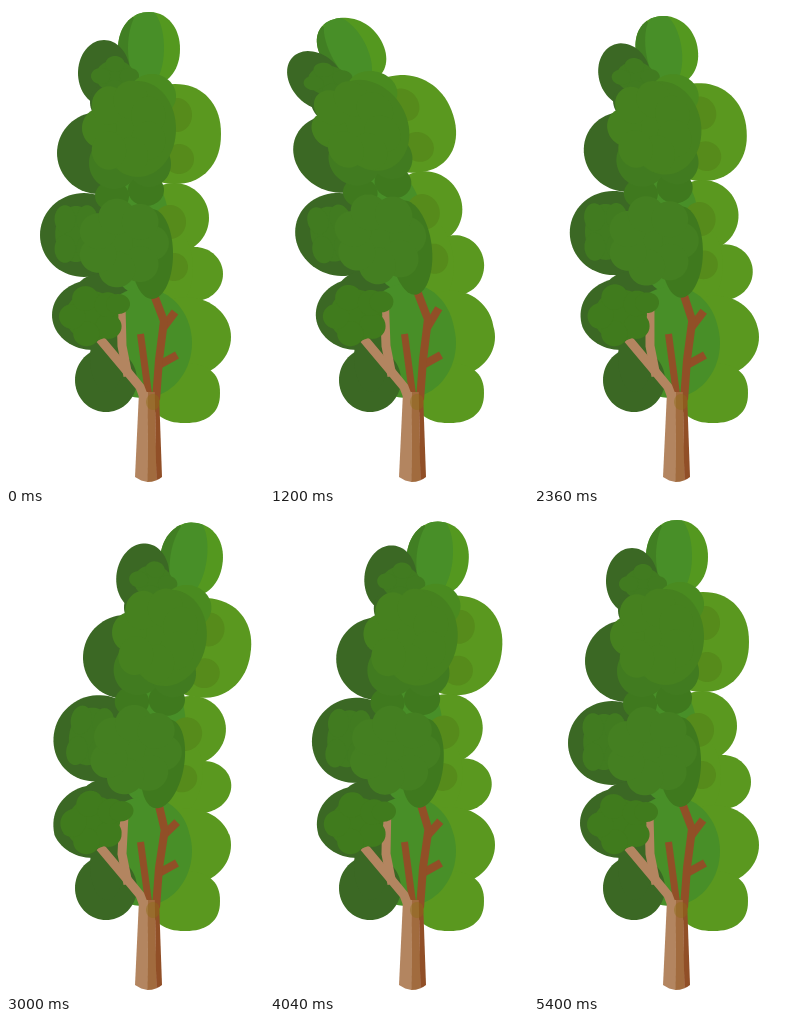
An HTML page with a canvas for the animation above (5.8 s loop, 258 by 480 pixels).

```html
<!DOCTYPE html>
<html>
<head>
<meta charset="utf-8">
<style>
  html, body { margin: 0; height: 100%; overflow: hidden; background: #fff; }
  canvas { display: block; }
</style>
</head>
<body>
<canvas id="stage" width="258" height="480"></canvas>
<script>
const ctx = document.getElementById('stage').getContext('2d');
const LOOP = 5800, STEP = 40;
const DARK = '#3b6824', LEAF = '#417b20', CROWN = '#46811f', LIGHT = '#5a981f',
      BRIGHT = '#488f28', OLIVE = '#568b1b', SHADE = '#3f791e';
const BARK = '#b38560', BARK_MID = '#a16b3e', BARK_DARK = '#914f27';

let left, right;

// Rises from 0 to 1 between start and peak, falls back until end
function hump(t, start, peak, end) {
  if (t <= start || t >= end) return 0;
  const p = t < peak ? (t - start) / (peak - start) : (end - t) / (end - peak);
  return (1 - Math.cos(Math.PI * p)) / 2;
}

// Moves a resting point with the wind: the crown bends and tilts more with height
function bend(x, y) {
  const h = Math.max(0, (320 - y) / 280);
  const tiltLeft = -0.2 * h ** 0.6 * (x - 60 - 90 * h * h);
  const tiltRight = 0.16 * h ** 0.4 * (x - 125);
  return [
    x - 61 * h ** 1.8 * left + 43 * h * right,
    y + tiltLeft * left + tiltRight * right
  ];
}

// Ellipse; a power below 1 makes it squarer
function blob(color, x, y, rx, ry = rx, power = 1) {
  const soft = v => Math.sign(v) * Math.abs(v) ** power;
  ctx.fillStyle = color;
  ctx.beginPath();
  for (let i = 0; i < 72; i++) {
    const a = i * Math.PI / 36;
    ctx.lineTo(...bend(x + rx * soft(Math.cos(a)), y + ry * soft(Math.sin(a))));
  }
  ctx.fill();
}

// Ring of lobes around a full middle
function clump(color, x, y, rx, ry, lobes, turn = 0) {
  blob(color, x, y, rx * 0.8, ry * 0.8);
  for (let i = 0; i < lobes; i++) {
    const a = turn + i * 2 * Math.PI / lobes;
    blob(color, x + 0.6 * rx * Math.cos(a), y + 0.6 * ry * Math.sin(a), rx * 0.4, ry * 0.4);
  }
}

function limb(color, width, ...points) {
  ctx.strokeStyle = color;
  ctx.lineWidth = width;
  ctx.beginPath();
  for (const point of points) ctx.lineTo(...bend(...point));
  ctx.stroke();
}

// Strip of the trunk between two fractions of its width
function strip(color, from, to) {
  const top = f => 133 + 20 * f, foot = f => 129 + 27 * f;
  ctx.fillStyle = color;
  ctx.beginPath();
  ctx.moveTo(top(from), 386);
  ctx.lineTo(top(to), 386);
  for (const f of [to, (from + to) / 2, from]) {
    ctx.lineTo(foot(f), 471 + 20 * f * (1 - f));
  }
  ctx.fill();
}

function backLeaves() {
  blob('#54981f', 143, 43, 31, 37, 0.95);
  ctx.save();
  ctx.clip();
  blob('#417f23', 112, 45, 24, 44);
  blob(BRIGHT, 140, 42, 18, 40);
  ctx.restore();

  blob(LIGHT, 169, 128, 46, 50, 0.92);
  blob(LIGHT, 168, 212, 35);
  blob(LIGHT, 189, 268, 28, 27);
  blob(LIGHT, 165, 262, 22, 40);
  blob(LIGHT, 180, 331, 45, 40);
  blob(LIGHT, 179, 387, 35, 30, 0.85);

  blob(DARK, 98, 67, 26, 33);
  blob(DARK, 102, 96, 18, 20);
  blob(DARK, 93, 147, 42, 41);
  blob(DARK, 78, 229, 44, 42);
  blob(DARK, 87, 309, 41, 35);
  blob(DARK, 98, 285, 28, 18);
  blob(BRIGHT, 132, 226, 32, 62);
  blob(BRIGHT, 137, 337, 49, 55);
  blob(DARK, 100, 374, 31, 32);
  blob(DARK, 101, 352, 17, 34);
}

function trunk() {
  limb(BARK_DARK, 8, [169, 306], [157, 322]);
  limb(BARK_DARK, 8, [171, 349], [153, 359]);
  limb(BARK_DARK, 8, [148, 289], [158, 315], [153, 354], [150, 394]);
  limb(BARK_DARK, 7, [134.5, 328], [143, 392]);
  limb(BARK, 9, [115, 300], [116, 340], [122, 370]);
  limb(BARK, 9, [94, 333], [120, 364], [134, 381], [139, 394]);
  strip(BARK, 0, 0.46);
  strip(BARK_MID, 0.45, 0.8);
  strip(BARK_DARK, 0.79, 1);
  blob('rgba(140,110,20,.4)', 147, 396, 7, 8);
}

function frontLeaves() {
  clump('#407b1d', 86, 310, 33, 31, 5, 0.6);
  blob('#407b1d', 112, 298, 12, 10);

  blob(SHADE, 106, 190, 17, 15);
  blob(SHADE, 140, 184, 18, 16);
  blob(OLIVE, 164, 216, 16, 17);
  blob(OLIVE, 168, 261, 14);
  blob(SHADE, 146, 248, 21, 45);
  clump(LEAF, 70, 228, 26, 35, 4, Math.PI / 4);
  clump('#447f21', 117, 237, 46, 45, 7);

  clump(LEAF, 109, 70, 24, 20, 4);
  blob(OLIVE, 171, 109, 15, 17);
  blob(OLIVE, 173, 153, 15);
  blob('#4a8b20', 146, 90, 24, 22);
  blob(LEAF, 108, 157, 25, 26);
  blob(LEAF, 143, 158, 22, 23);
  blob(CROWN, 132, 123, 38, 48);
  clump(CROWN, 119, 122, 43, 48, 7, Math.PI);
}

function draw(now) {
  const t = Math.floor(now % LOOP / STEP) * STEP;
  left = 1.2 * hump(t, 0, 1600, 2900);
  right = hump(t, 1850, 3050, 5250);
  ctx.clearRect(0, 0, 258, 480);
  backLeaves();
  trunk();
  frontLeaves();
}

const start = performance.now();
function tick() {
  draw(performance.now() - start);
  requestAnimationFrame(tick);
}
tick();
</script>
</body>
</html>
```
